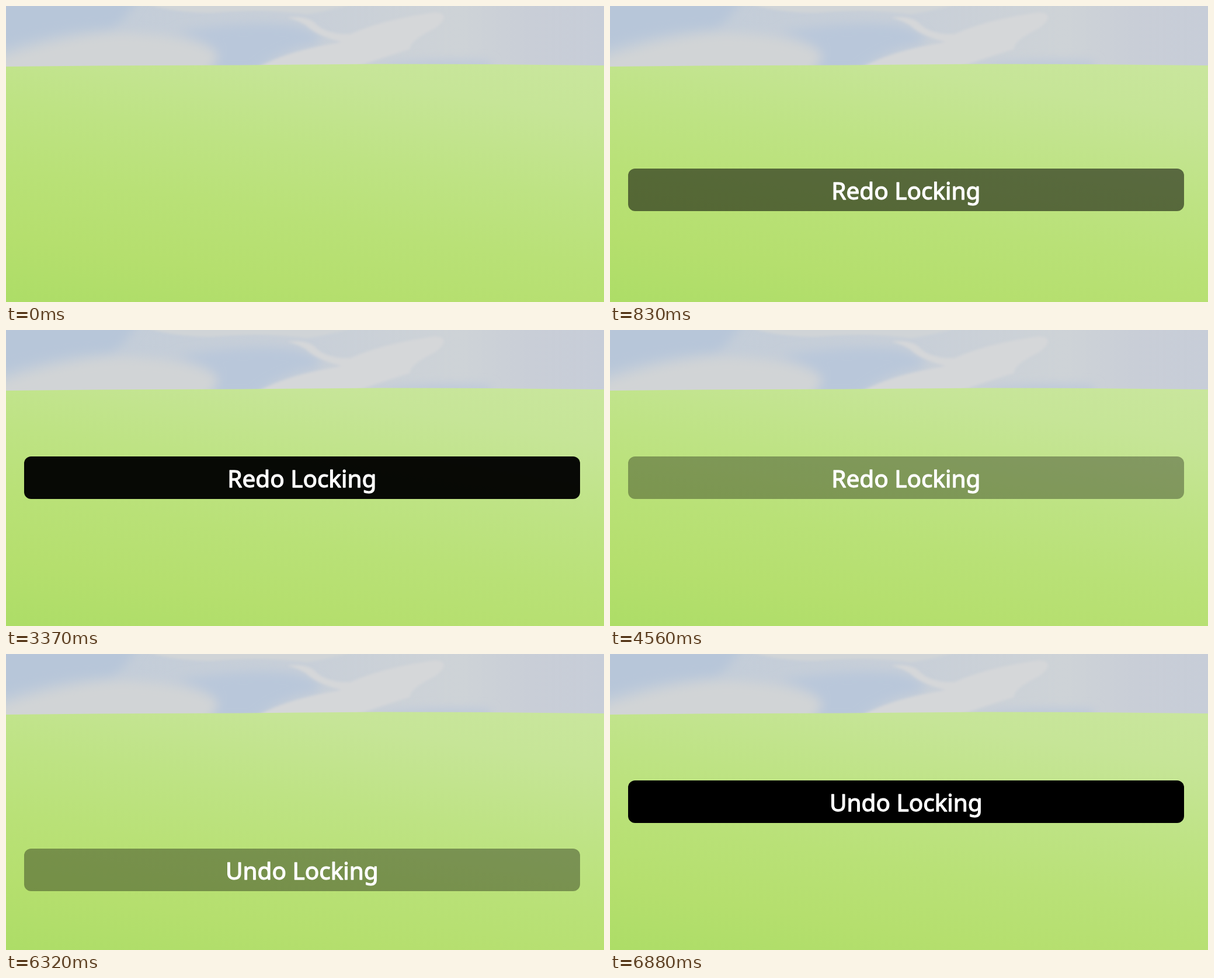
Animation of 1024 by 508 pixels, one loop 8 s. Source, as an HTML page:

```html
<!DOCTYPE html>
<html lang="en">
<head>
<meta charset="utf-8">
<style>
  html, body { margin: 0; width: 100%; height: 100%; overflow: hidden; }
  svg { display: block; width: 1024px; height: 508px; }
  text {
    font: 40.5px "Noto Sans", "Open Sans", sans-serif;
    fill: #fff; stroke: #fff; stroke-width: 1.3px; stroke-linejoin: round;
    text-anchor: middle;
  }
</style>
</head>
<body>
<svg viewBox="0 0 1024 508">
  <defs>
    <linearGradient id="grass" gradientUnits="userSpaceOnUse" x1="1000" y1="100" x2="904" y2="662">
      <stop offset="0" stop-color="#c9e69d"/>
      <stop offset=".16" stop-color="#c6e597"/>
      <stop offset=".4" stop-color="#bee384"/>
      <stop offset=".6" stop-color="#b9e177"/>
      <stop offset=".8" stop-color="#b5df6e"/>
      <stop offset="1" stop-color="#addd67"/>
    </linearGradient>
    <linearGradient id="sky">
      <stop offset="0" stop-color="#c1ccd9"/>
      <stop offset=".5" stop-color="#c8cfd8"/>
      <stop offset=".76" stop-color="#ced3d7"/>
      <stop offset=".88" stop-color="#c9ced7"/>
      <stop offset="1" stop-color="#c7cdd8"/>
    </linearGradient>
    <filter id="soft" x="-20%" y="-50%" width="140%" height="200%"><feGaussianBlur stdDeviation="9"/></filter>
    <filter id="crisp" x="-20%" y="-50%" width="140%" height="200%"><feGaussianBlur stdDeviation="2"/></filter>
  </defs>

  <rect width="1024" height="120" fill="url(#sky)"/>
  <g filter="url(#soft)">
    <path fill="#b7c6d9" d="M-20-20H230Q205 25 180 38Q90 40-20 75Z"/>
    <path fill="#b9c7da" d="M290 45Q400 25 490 32Q560 50 530 66Q460 78 425 115H340Q400 70 290 45Z"/>
    <path fill="#d1d4d6" d="M-20 92Q100 50 200 46Q320 50 365 85L340 125H-20Z"/>
    <path fill="#bcc8da" d="M610 112Q680 88 830 96V112Z"/>
  </g>
  <g filter="url(#crisp)">
    <path fill="#d0d4d7" d="M238-6Q270 10 350 12Q440 4 515 14Q560 8 600-6Z"/>
    <path fill="#d5d7d9" d="M430 106Q485 76 575 62Q530 50 515 34Q500 24 482 20Q515 16 530 30Q550 50 590 48Q650 22 735 11Q765 14 735 38Q690 60 692 74Q640 90 595 106Z"/>
  </g>
  <path fill="url(#grass)" d="M0 104L155 102.5L400 101.5L512 100.5L640 99.5L820 100L1024 102V508H0Z"/>

  <g id="banner">
    <rect id="bar" x="31" width="952" height="73" rx="12"/>
    <text id="label" x="506.8" y="53"></text>
  </g>
</svg>
<script>
const LOOP = 8000, STEP = 69.3, TOP = 217, RISE = 198, SLIDE = 1070;
const [banner, bar, label] = ["banner", "bar", "label"].map(id => document.getElementById(id));

const clamp = p => Math.min(1, Math.max(0, p));
const cubicInOut = p => p < .5 ? 4 * p ** 3 : 1 - 4 * (1 - p) ** 3;
const sineInOut = p => (1 - Math.cos(Math.PI * p)) / 2;
// The picture advances in discrete steps counted from each start.
const stepped = (t, start) => start + Math.floor((t - start + 8) / STEP) * STEP;

function show(text, y, alpha) {
  label.textContent = text;
  banner.setAttribute("transform", `translate(0 ${Math.round(y)})`);
  bar.setAttribute("fill-opacity", alpha);
}

function slideIn(text, t, shown, begin) {
  const p = clamp((stepped(t, shown) - begin) / SLIDE);
  show(text, TOP + RISE * (1 - cubicInOut(p)), sineInOut(clamp((p - .1) / .9)));
}

function fadeOut(text, t) {
  const p = clamp((stepped(t, 3370) - 3300) / 2080);
  show(text, TOP, (1 - p) ** 1.2);
}

function draw(now) {
  const t = now % LOOP;
  banner.style.display = t < 280 || (t >= 5380 && t < 5910) ? "none" : "";
  if (t < 3370) slideIn("Redo Locking", t, 280, 223);
  else if (t < 5380) fadeOut("Redo Locking", t);
  else slideIn("Undo Locking", t, 5910, 5826);
}

let origin;
function tick(now) {
  origin ??= now;
  draw(now - origin);
  requestAnimationFrame(tick);
}
draw(0);
requestAnimationFrame(tick);
</script>
</body>
</html>
```
